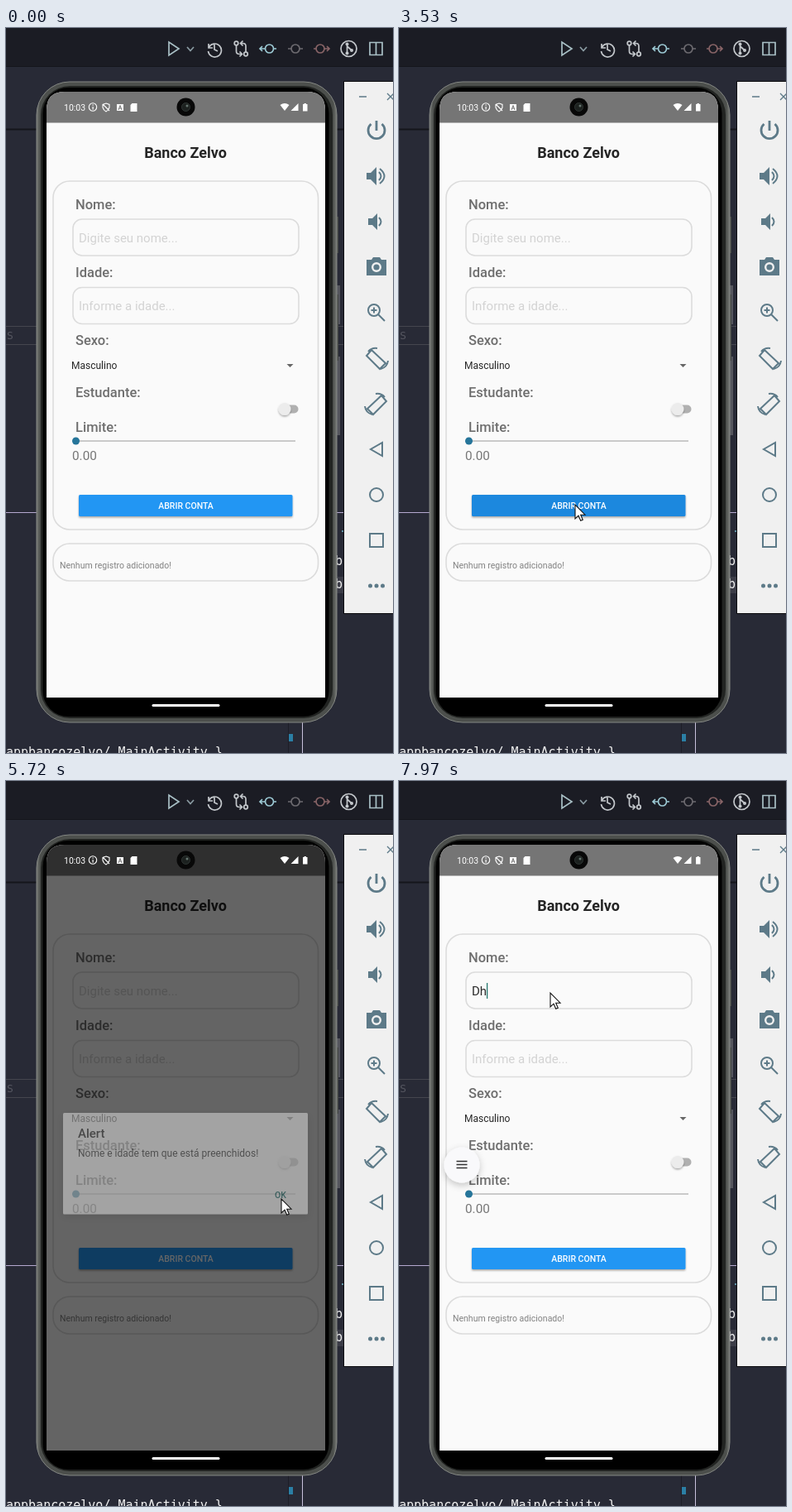
These frames come from a looping animation (468 by 876 pixels, 8 s). An HTML page:

```html
<!DOCTYPE html>
<html lang="pt">
<head>
<meta charset="utf-8">
<style>
html, body { margin: 0; width: 100%; height: 100%; overflow: hidden; background: #282a36; }
svg { display: block; width: 468px; height: 876px; font-family: Roboto, sans-serif; }
.line { fill: none; stroke-width: 1.7; }
.box { fill: none; stroke: #dcdcdc; stroke-width: 1.6; }
.label { font-size: 16.5px; font-weight: 500; fill: #6e6e6e; }
.hint { font-size: 15px; fill: #d3d3d3; }
.code { font: 15px "DejaVu Sans Mono", monospace; fill: #f2f2f2; }
</style>
</head>
<body>
<svg viewBox="0 0 468 876">
  <defs>
    <linearGradient id="metal">
      <stop offset="0" stop-color="#777a76"/><stop offset=".012" stop-color="#4c4f4c"/>
      <stop offset=".988" stop-color="#4c4f4c"/><stop offset="1" stop-color="#777a76"/>
    </linearGradient>
    <filter id="soft" x="-50%" y="-50%" width="200%" height="200%">
      <feDropShadow dx="0" dy="3" stdDeviation="4" flood-opacity=".22"/>
    </filter>
    <filter id="low" x="-20%" y="-20%" width="140%" height="170%">
      <feDropShadow dx="0" dy="1.5" stdDeviation="1.2" flood-opacity=".35"/>
    </filter>
    <clipPath id="screen"><path d="M49 809V99Q49 77 71 77H364Q386 77 386 99V809Z"/></clipPath>
  </defs>

  <!-- editor -->
  <rect width="468" height="876" fill="#282a36"/>
  <rect width="468" height="46" fill="#1b1c24"/>
  <path d="M0 46.5H468" stroke="#15161c"/>
  <path d="M0 122.5H468" stroke="#14151b" stroke-width="2"/>
  <path d="M0 360.5H408M0 382.5H408" stroke="#45464e"/>
  <text x="1" y="376" class="code" style="font-size:13px;fill:#565761">S</text>
  <path d="M0 585.5H408" stroke="#b5a9cf"/>
  <path d="M402 311V358M402 397V492" stroke="#55565e" stroke-width="4"/>
  <path d="M406 608h2" stroke="#6fb5c9" stroke-width="1.5"/>
  <path d="M398 663H408V683H398Z" fill="#3b3c47"/>
  <text x="398" y="649" class="code">bo</text>
  <text x="398" y="677" class="code">ba</text>
  <path d="M358.5 780V876" stroke="#c8c2dc"/>
  <path d="M341.5 838V876" stroke="#1d1e27"/>
  <rect x="342" y="853" width="5" height="9" fill="#2b7fa5"/>
  <text x="0" y="880" class="code">appbancozelvo/.MainActivity }</text>

  <!-- toolbar -->
  <g class="line" stroke="#c3c7cb">
    <path d="M197 17V33L209 25Z" stroke="#a9c0c6"/>
    <path d="M219 23L223 27.500 227 23" stroke="#8a9ba2"/>
    <path d="M245 19V24H250M245.500 23A8 8 0 1 1 244.500 28M252 20V26L256 28"/>
    <circle cx="278.500" cy="18.500" r="2.300"/><circle cx="290" cy="31.500" r="2.300"/>
    <path d="M278.500 21V28Q278.500 31.500 282 31.500H285M282.500 28.500L285.500 31.500 282.500 34.500M290 29V22Q290 18.500 286.500 18.500H284M286.500 15.500L283.500 18.500 286.500 21.500"/>
    <g stroke="#9cc9d4"><circle cx="318.500" cy="25" r="5"/><path d="M313 25H307M310 22L307 25 310 28M324 25H327"/></g>
    <g stroke="#6d6b70"><circle cx="350" cy="25" r="5"/><path d="M341 25H345M355 25H359"/></g>
    <g stroke="#886467"><circle cx="380" cy="25" r="5"/><path d="M372 25H375M385 25H391M388 22L391 25 388 28"/></g>
    <circle cx="414.500" cy="25" r="9.500"/>
    <path d="M412.500 19V31M412.500 22L418 27"/>
    <g fill="#c3c7cb" stroke="none"><circle cx="412.500" cy="19.500" r="2"/><circle cx="412.500" cy="30.500" r="2"/><circle cx="418" cy="27" r="2"/></g>
    <path d="M440 17.500H455V32.500H440ZM447.500 17.500V32.500" stroke="#a9c0c6"/>
  </g>

  <!-- emulator side panel -->
  <rect x="408.500" y="64.500" width="70" height="643" fill="#f0f0f0" stroke="#0c0c0f"/>
  <g class="line" stroke="#5d7a88" style="stroke-width:2">
    <path d="M427 83H436M461 79L469 87M469 79L461 87" stroke-width="1.300" style="stroke-width:1.300"/>
    <path d="M448 112V124M441.500 116A10 10 0 1 0 454.500 116" style="stroke-width:2.800"/>
    <path d="M451 174Q456 179 451 184M452 170Q463 179 452 188M451 229Q456 234 451 239"/>
    <circle cx="445" cy="341" r="7"/><path d="M450 346L458 354M441.500 341H448.500M445 337.500V344.500"/>
    <g id="turn"><path d="M442 389L459 405 452 412 436 396ZM438 391Q442 386 449 387M462 402Q461 410 453 412" /></g>
    <use href="#turn" transform="matrix(-1 0 0 1 896 55)"/>
    <path d="M455 501V517L441 509Z"/><circle cx="448" cy="564" r="8"/><path d="M440 611H456V627H440Z"/>
  </g>
  <g fill="#5d7a88">
    <path d="M436 175H441L448 168V190L441 183H436ZM438 230H443L449 224V244L443 238H438Z"/>
    <path fill-rule="evenodd" d="M436 280H442L444 277H452L454 280H460V299H436ZM448 283A6 6 0 1 0 448 295A6 6 0 1 0 448 283Z"/><circle cx="448" cy="289" r="3.600"/>
    <circle cx="440.500" cy="674" r="2.500"/><circle cx="448" cy="674" r="2.500"/><circle cx="455.500" cy="674" r="2.500"/>
  </g>

  <!-- phone -->
  <path d="M399 228h3v44h-3zM399 322h3v80h-3z" fill="#454845"/>
  <rect x="37" y="65" width="363" height="774" rx="40" fill="url(#metal)" stroke="#858884"/>
  <rect x="42" y="70" width="353" height="764" rx="35" fill="#222422"/>
  <rect x="44.500" y="72" width="346" height="760" rx="31" fill="#000"/>
  <g clip-path="url(#screen)">
    <rect x="49" y="77" width="337" height="732" fill="#fafafa"/>
    <rect x="49" y="77" width="337" height="37.500" fill="#757575"/>
    <text x="217" y="156.500" text-anchor="middle" font-size="18" font-weight="700" fill="#252525">Banco Zelvo</text>
    <rect class="box" x="57" y="185" width="320.500" height="421" rx="20"/>
    <rect class="box" x="81" y="231" width="273" height="44" rx="11"/>
    <rect class="box" x="81" y="313.500" width="273" height="44" rx="11"/>
    <rect class="box" x="57" y="623" width="320.500" height="45" rx="20"/>
    <g class="label">
      <text x="84" y="218.500">Nome:</text><text x="84" y="300.500">Idade:</text>
      <text x="84" y="383">Sexo:</text><text x="84" y="445.500">Estudante:</text><text x="84" y="488">Limite:</text>
    </g>
    <text id="name" class="hint" x="88" y="259"></text>
    <path id="caret" d="M106.500 244V263" stroke="#25786f" stroke-width="1.300"/>
    <text class="hint" x="88" y="341">Informe a idade...</text>
    <text x="79" y="412" font-size="12" fill="#252525">Masculino</text>
    <path d="M339.500 406H347.500L343.500 410Z" fill="#666"/>
    <rect x="331" y="455.500" width="22.500" height="10" rx="5" fill="#b0b0b0"/>
    <circle cx="337" cy="460.500" r="7.500" fill="#ececec" filter="url(#low)"/>
    <path d="M85 499H350" stroke="#cacaca" stroke-width="1.800"/>
    <circle cx="84.500" cy="499" r="4.500" fill="#26759a"/>
    <text x="80" y="522" font-size="15.300" fill="#777">0.00</text>
    <rect id="button" x="88" y="564" width="258.500" height="26" rx="1.500" filter="url(#low)"/>
    <text x="217.500" y="581" text-anchor="middle" font-size="10.500" font-weight="500" fill="#fff">ABRIR CONTA</text>
    <text x="65" y="653" font-size="10.500" fill="#828282">Nenhum registro adicionado!</text>
    <rect id="dim" x="49" y="77" width="337" height="732"/>
    <g id="dialog">
      <rect x="69" y="401" width="296" height="122.500" rx="1.500" fill="#fff" filter="url(#soft)"/>
      <text x="87" y="430.500" font-size="15" font-weight="500" fill="#222">Alert</text>
      <text x="87" y="453.500" font-size="12" fill="#333">Nome e idade tem que está preenchidos!</text>
      <text x="325" y="504" font-size="10.500" font-weight="500" fill="#0b625f">OK</text>
    </g>
    <g id="menu">
      <circle cy="464" r="21.500" fill="#f9f9fb" filter="url(#soft)"/>
      <path d="M-6.500 459.500H6.500M-6.500 463.500H6.500M-6.500 467.500H6.500" stroke="#333" stroke-width="1.400"/>
    </g>
  </g>

  <!-- status bar and camera -->
  <g fill="#fff">
    <text x="70" y="99.500" font-size="10.500">10:03</text>
    <path d="M104.500 92.500h1.200v1.200h-1.200zM104.500 95h1.200v3.500h-1.200z"/>
    <path d="M134 92H142V100H134Z"/><path d="M152.500 91H158.500V101H150.500V93Z"/>
    <path d="M331.500 93Q337 89 342.500 93L337 100ZM344.500 100H353.500V91ZM359 92H360.500V91H363V92H364.500V100.500H359Z"/>
  </g>
  <path d="M136 99L138 93.500 140 99M137 97H139" fill="none" stroke="#757575"/>
  <g fill="none" stroke="#fff" stroke-width="1.100">
    <circle cx="105" cy="95.500" r="4.700"/>
    <path d="M121 91L125 92.500V96Q124 99.500 121 101Q118 99.500 117 96V92.500ZM117 92L125 100"/>
  </g>
  <circle cx="217.500" cy="95.500" r="11" fill="#080808"/>
  <circle cx="217.500" cy="95.500" r="5" fill="#1c211f" stroke="#303634"/>
  <circle cx="219" cy="94" r="1.500" fill="#667570"/>
  <path d="M178 818.500H257" stroke="#fff" stroke-width="3" stroke-linecap="round"/>

  <path id="cursor" d="M0 0V17L4 13.200 6.700 19.300 9.300 18.200 6.700 12.200H12Z" fill="#fff" stroke="#111" stroke-width="1.100"/>
</svg>
<script>
const LOOP = 8000;
const CURSOR_PATH = [
  [130, 41, 765], [370, 200, 500], [590, 366, 195], [810, 185, 256], [1700, 185, 256],
  [2150, 188, 415], [2500, 278, 594], [2910, 213, 576], [3800, 213, 576],
  [4500, 214, 496], [4700, 214, 496], [4910, 337, 520], [5110, 337, 520],
  [5450, 333, 505], [5930, 333, 505], [6400, 183, 256], [LOOP, 183, 256]
];
const el = id => document.getElementById(id);
const ramp = (t, from, to) => Math.min(1, Math.max(0, (t - from) / (to - from)));
const during = (t, a, b, c, d) => ramp(t, a, b) - ramp(t, c, d);

function cursorAt(t) {
  const i = Math.max(1, CURSOR_PATH.findIndex(p => p[0] > t));
  const [t0, x0, y0] = CURSOR_PATH[i - 1], [t1, x1, y1] = CURSOR_PATH[i];
  const p = ramp(t, t0, t1), k = p * p * (3 - 2 * p);
  return [x0 + (x1 - x0) * k, y0 + (y1 - y0) * k];
}

function draw(now) {
  const t = now % LOOP;
  el("cursor").setAttribute("transform", `translate(${cursorAt(t)})`);
  el("cursor").style.opacity = t < 130 ? 0 : 1;

  el("button").style.fill = t > 3430 && t < 3870 ? "#1e88de" : "#2196f3";
  el("dim").style.opacity = 0.6 * during(t, 3870, 4080, 5730, 5860);
  el("dialog").style.opacity = during(t, 3870, 4080, 5650, 5770);

  const firstFocus = t < 4000;
  el("menu").style.opacity = firstFocus ? during(t, 940, 1150, 2200, 2450) : ramp(t, 7080, 7290);
  el("menu").setAttribute("transform", `translate(${firstFocus ? 78.5 : 76} 0)`);

  const typed = "Dh".slice(0, (t >= 7690) + (t >= 7830));
  const name = el("name");
  name.textContent = typed || "Digite seu nome...";
  name.style.fill = typed ? "#2b2b2b" : "";
  const caretX = typed ? name.getComputedTextLength() : 0;
  el("caret").setAttribute("transform", `translate(${caretX - 18} 0)`);
  el("caret").style.opacity = typed || (t >= 6810 && (t - 6810) % 1000 < 500) ? 1 : 0;

  requestAnimationFrame(draw);
}
requestAnimationFrame(draw);
</script>
</body>
</html>
```
